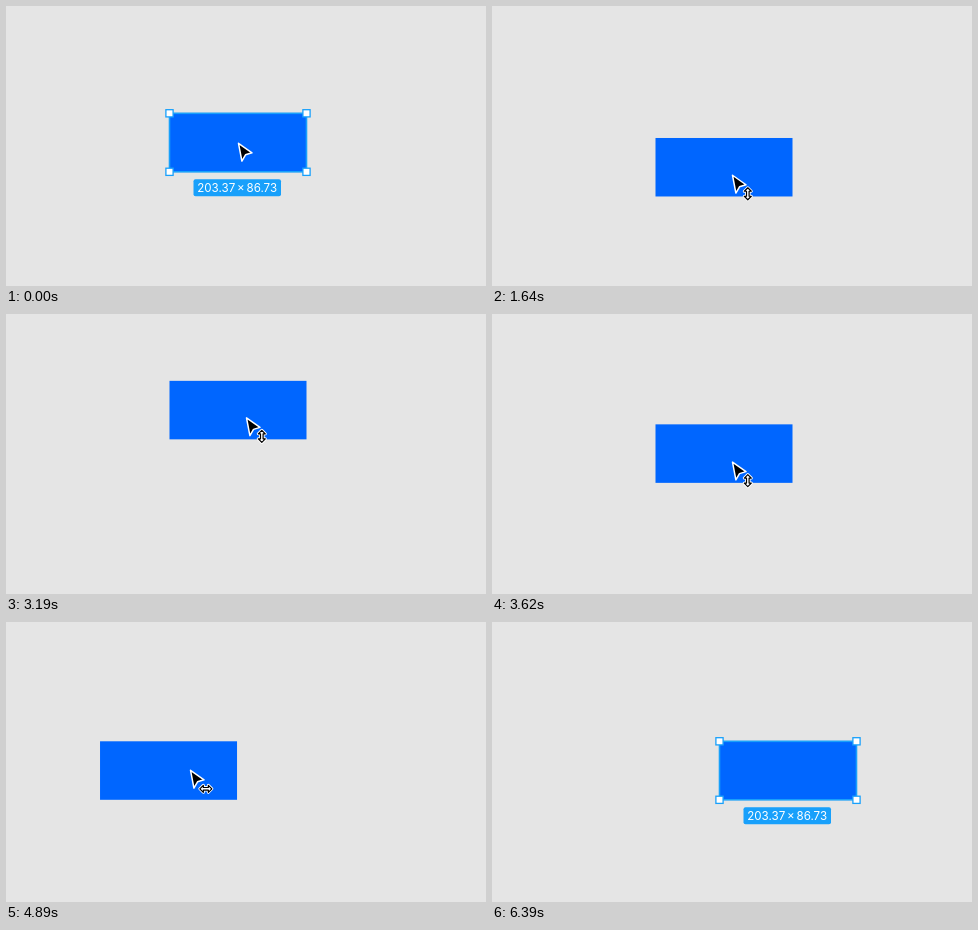
These frames come from a looping animation (480x280 px, 6.96 s). An HTML page:

```html
<!DOCTYPE html>
<html lang="en">
<head>
<meta charset="utf-8">
<title>Axis-locked drag</title>
<style>
  html, body { margin: 0; width: 100%; height: 100%; overflow: hidden; background: #e5e5e5; }
  svg { display: block; width: 480px; height: 280px; }
  text { font: 400 11.6px Inter, sans-serif; word-spacing: -1.5px; fill: #fff; text-anchor: middle; }
</style>
</head>
<body>
<svg viewBox="0 0 480 280">
  <defs>
    <rect id="handle" x="-3.6" y="-3.6" width="7.2" height="7.2" fill="#fff" stroke="#18a0fb" stroke-width="1.3"/>
    <path id="double" d="M0-6 3.5-2.5H1.3V2.5H3.5L0 6-3.5 2.5H-1.3V-2.5H-3.5Z" stroke-linejoin="round"/>
  </defs>
  <g id="box">
    <rect width="137" height="58.5" fill="#06f"/>
    <g id="selection">
      <rect width="137" height="58.5" fill="none" stroke="#18a0fb" stroke-width="1.6"/>
      <use href="#handle"/>
      <use href="#handle" x="137"/>
      <use href="#handle" y="58.5"/>
      <use href="#handle" x="137" y="58.5"/>
      <rect x="24" y="66" width="87.5" height="17" rx="2" fill="#18a0fb"/>
      <text x="67.7" y="78.8">203.37 × 86.73</text>
    </g>
  </g>
  <g id="cursor">
    <path d="M0 .5 13.5 10 7 12 3.4 18.3Z" stroke="#fff" stroke-width="1.5" stroke-linejoin="round"/>
    <g id="arrows">
      <use href="#double" stroke="#fff" stroke-width="3"/>
      <use href="#double" fill="#fff" stroke="#000" stroke-width="1.2"/>
    </g>
  </g>
</svg>
<script>
const LOOP = 6960;
const LEAD = 33; // the box trails the pointer while dragged

const smooth = p => p * p * (3 - 2 * p);
const accelerate = p => p ** 1.6;

// Distance covered at time t by a move of the given length.
const glide = (t, start, end, distance, ease = smooth) =>
  distance * ease(Math.min(1, Math.max(0, (t - start) / (end - start))));

const boxX = t => 163.5 + glide(t, 4440, 5090, -89.5) + glide(t, 5280, 5900, 153.5);

const boxY = t => 107.3 + glide(t, 1060, 1870, 42, accelerate)
  + glide(t, 2180, 2860, -85) + glide(t, 3100, 3800, 55);

// Pointer position relative to the box.
function grab(t) {
  const approach = glide(t, 30, 210, 1);
  const settle = glide(t, 540, 690, 1);
  const regrip = glide(t, 3880, 4170, 1);
  const leave = glide(t, 6150, 6340, 1);
  return [
    69 + 6 * approach + 2 * settle + 19 * regrip + 39 * leave,
    29.5 + 10 * approach - 5 * settle - 6 * regrip + 66 * leave
  ];
}

const [box, selection, cursor, arrows] =
  ['box', 'selection', 'cursor', 'arrows'].map(id => document.getElementById(id));
const show = (el, on) => el.setAttribute('visibility', on ? 'visible' : 'hidden');
const move = (el, x, y, angle = 0) =>
  el.setAttribute('transform', `translate(${x} ${y}) rotate(${angle})`);

function draw(t) {
  const vertical = t >= 1090 && t < 3850;
  const horizontal = t >= 4400 && t < 6210;
  const dragging = vertical || horizontal;
  const [grabX, grabY] = grab(t);
  move(box, boxX(t), boxY(t));
  move(cursor, boxX(t + LEAD) + grabX, boxY(t + LEAD) + grabY);
  move(arrows, 15.3, 19, horizontal ? 90 : 0);
  show(selection, !dragging);
  show(arrows, dragging);
  show(cursor, t < 6390);
}

const start = performance.now();
function tick() {
  draw((performance.now() - start) % LOOP);
  requestAnimationFrame(tick);
}
tick();
</script>
</body>
</html>
```
